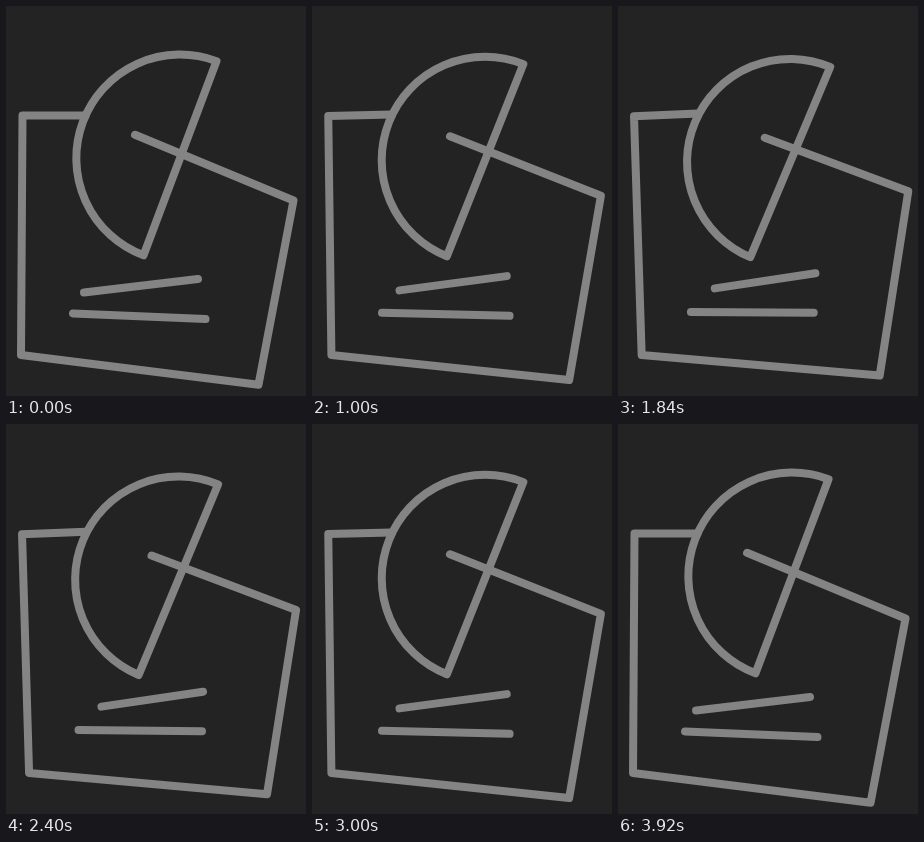
Recreate the animation shown at these times as an HTML page. Size 300 px wide and 390 px high, loop 4000 ms.

```html
<!DOCTYPE html>
<html lang="en">
<head>
<meta charset="utf-8">
<title>Swaying sketch</title>
<style>
  html, body {
    margin: 0;
    width: 100%;
    height: 100%;
    overflow: hidden;
    background: #232323;
  }
  svg {
    display: block;
    width: 300px;
    height: 390px;
  }
  path {
    fill: none;
    stroke: #848484;
    stroke-width: 8;
    stroke-linecap: round;
    stroke-linejoin: round;
    animation: 2s ease-in-out infinite alternate;
  }
  .sheet { animation-name: sheet; }
  .dome { animation-name: dome; }
  .upper { animation-name: upper; }
  .lower { animation-name: lower; }

  @keyframes sheet {
    from { d: path("M79.5 109.5 L16.5 109.5 L15 349 L252.5 378.7 L287.5 194.5 L129 128.8"); }
    to { d: path("M80.5 107.5 L16 110.3 L23.8 349 L261.8 369.4 L290.3 185.2 L147 131.8"); }
  }
  /* The small radius grows to half the chord, giving a half circle. */
  @keyframes dome {
    from { d: path("M210.5 55.2 A100 100 0 0 0 137.5 249.3 Z"); }
    to { d: path("M212.2 61 A100 100 0 0 0 132.2 251.2 Z"); }
  }
  @keyframes upper {
    from { d: path("M78 286.5 L192 273"); }
    to { d: path("M97 282.3 L197.5 267.2"); }
  }
  @keyframes lower {
    from { d: path("M67 307.5 L199.5 313"); }
    to { d: path("M73 306 L195.7 306.6"); }
  }
</style>
</head>
<body>
<svg viewBox="0 0 300 390">
  <path class="sheet" />
  <path class="dome" />
  <path class="upper" />
  <path class="lower" />
</svg>
</body>
</html>
```
